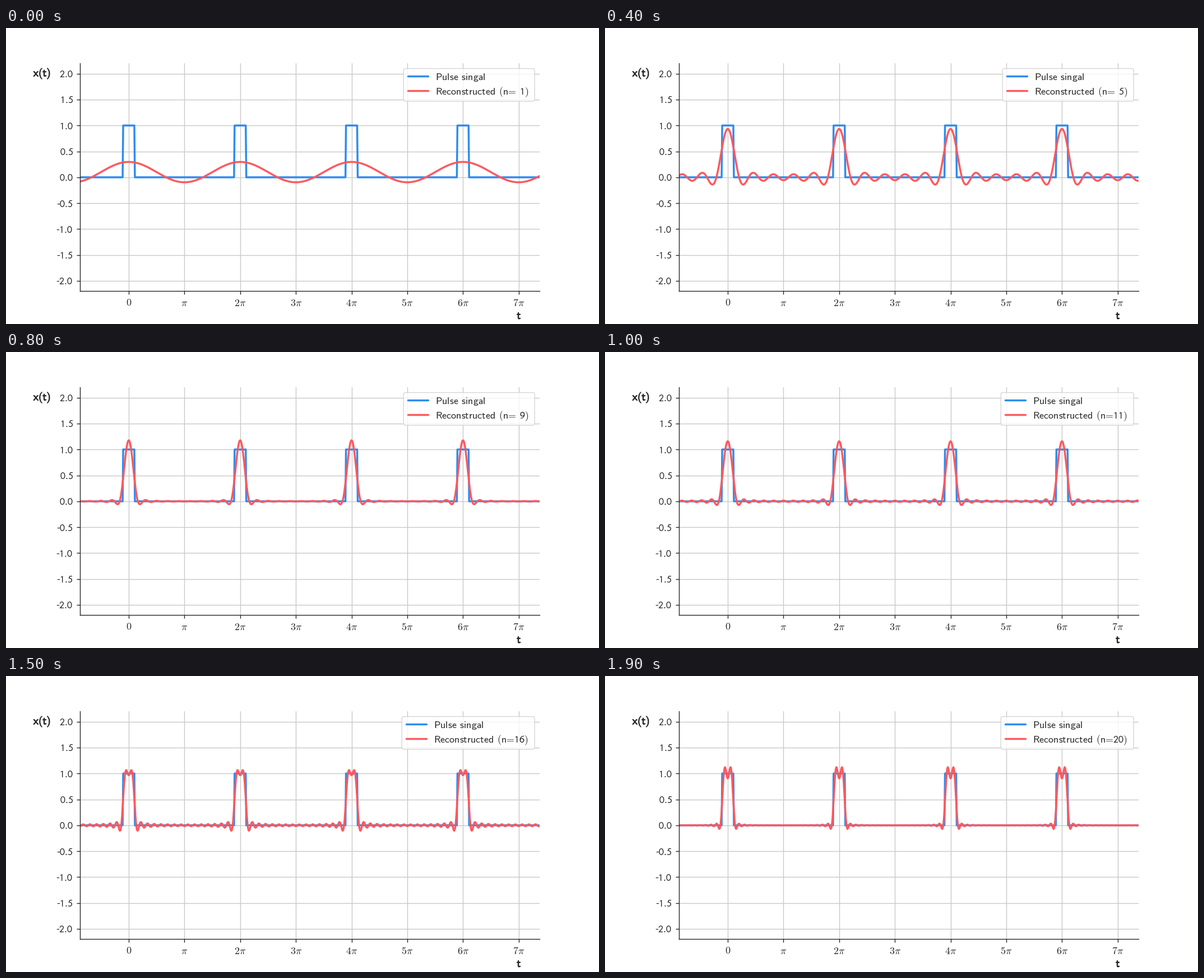
These frames come from a looping animation (1058 by 529 pixels, 2000 ms). A matplotlib script:

```python
from itertools import groupby

import matplotlib.pyplot as plt
import numpy as np
from matplotlib.animation import FuncAnimation
from matplotlib.lines import Line2D
from matplotlib.patches import FancyBboxPatch
from matplotlib.patheffects import withStroke
from matplotlib.transforms import IdentityTransform

W, H, DPI = 1058, 529, 100
FRAMES, INTERVAL = 20, 100
DUTY = 0.1
INK, GRID = "#262626", "#c8c8c8"
BLUE, RED = "#2d8cf0", "#ff595e"
SIZE = 13
PIXELS = IdentityTransform()

plt.rcParams.update({
    "font.family": "Liberation Sans",
    "font.size": SIZE,
    "mathtext.fontset": "cm",
    "text.color": INK,
    "lines.linewidth": 2.5,
    "lines.solid_capstyle": "round",
})

MARKS = {
    " ": r"$\hspace{0.41}$",
    "=": r"$\hspace{-0.2}\mathrm{=}\hspace{-0.2}$",
    "(": r"$\mathrm{(}$",
    ")": r"$\mathrm{)}$",
}
SANS_ZERO = 0x1D7E2  # Unicode block of sans-serif digits


def sans(text):
    """Set letters and digits in math sans faces, other marks one by one."""
    parts = []
    for is_word, run in groupby(text, str.isalpha):
        if is_word:
            parts.append(rf"$\mathsf{{{''.join(run)}}}$")
            continue
        for c in run:
            if c.isdigit():
                parts.append(rf"$\mathrm{{{chr(SANS_ZERO + int(c))}}}$")
            else:
                parts.append(MARKS.get(c, c))
    return "".join(parts)


def pulse(t):
    phase = (t + np.pi) % (2 * np.pi) - np.pi
    return (np.abs(phase) < DUTY * np.pi + 1e-6).astype(float)


def partial_sum(t, n):
    """Fourier series of the pulse train up to the n-th harmonic."""
    k = np.arange(1, n + 1)[:, None]
    return DUTY + (2 * np.sin(k * np.pi * DUTY) / (k * np.pi) * np.cos(k * t)).sum(axis=0)


def label(x, y, text, **style):
    return fig.text(x, H - y, text, transform=PIXELS, va="baseline", **style)


def bold_label(x, y, text):
    stroke = [withStroke(linewidth=0.7, foreground=INK)]
    return label(x, y, rf"$\mathsf{{{text}}}$", ha="center", fontsize=14,
                 path_effects=stroke)


fig = plt.figure(figsize=(W / 100, H / 100), dpi=DPI, facecolor="white")
ax = fig.add_axes([132.05 / W, 58.53 / H, 0.775, 0.77])
ax.set_xlim(-0.875 * np.pi, 7.375 * np.pi)
ax.set_ylim(-2.2, 2.2)
ax.set_axisbelow(True)
ax.grid(color=GRID, linewidth=1)
ax.spines[["top", "right"]].set_visible(False)
for side in ("left", "bottom"):
    ax.spines[side].set(color=INK, linewidth=1)
ax.tick_params(length=4.5, width=1, color=INK, labelcolor=INK)
ax.tick_params(axis="x", pad=4.8)
ax.tick_params(axis="y", pad=4.2)

steps = range(8)
ax.set_xticks([k * np.pi for k in steps],
              ["$0$", r"$\pi$"] + [rf"${k}\pi$" for k in steps[2:]])
levels = np.arange(-4, 5) / 2
ax.set_yticks(levels, [sans(f"{v:.1f}") for v in levels])
bold_label(64.5, 86.3, "x(t)")
bold_label(915.6, 520, "t")

t = np.linspace(-2 * np.pi, 8 * np.pi, 1001)
ax.plot(t, pulse(t), color=BLUE)
wave, = ax.plot(t, partial_sum(t, 1), color=RED)

# Legend, laid out in pixels
RIGHT, TOP, BOTTOM = 943.2, 72.5, 131
frame = FancyBboxPatch((709, H - BOTTOM), RIGHT - 709, BOTTOM - TOP,
                       boxstyle="round,pad=0,rounding_size=3.6",
                       facecolor="white", edgecolor="#cccccc", linewidth=1,
                       alpha=0.8, transform=PIXELS)
fig.add_artist(frame)
rows = []
for y, color, text in ((86.3, BLUE, "Pulse singal"), (112.4, RED, "")):
    line = Line2D([0, 0], [H - y, H - y], color=color, transform=PIXELS)
    fig.add_artist(line)
    rows.append((line, label(0, y + 6.3, sans(text))))


def update(i):
    n = i + 1
    wave.set_ydata(partial_sum(t, n))
    left = 709.3 if n < 10 else 706.3
    frame.set_x(left)
    frame.set_width(RIGHT - left)
    for line, text in rows:
        line.set_xdata([left + 7.5, left + 43.6])
        text.set_x(left + 57)
    rows[1][1].set_text(sans(f"Reconstructed (n={n:2d})"))
    return []


anim = FuncAnimation(fig, update, frames=FRAMES, interval=INTERVAL,
                     repeat=True, repeat_delay=0, blit=False)
plt.show()
```
